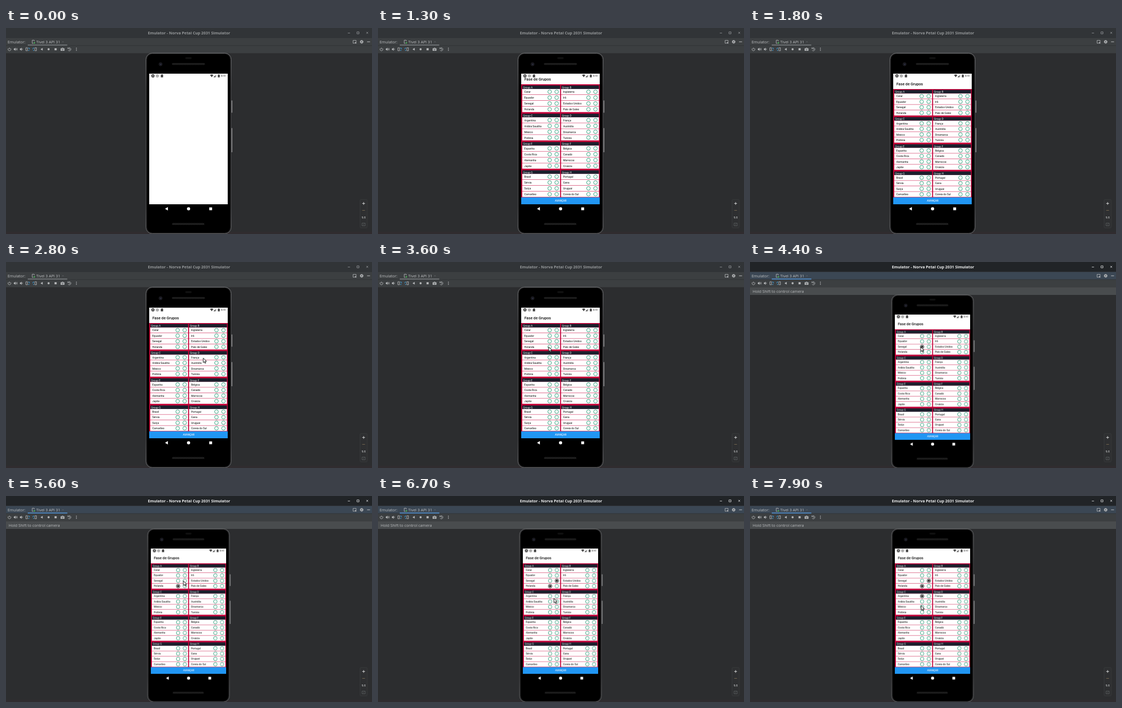
An HTML page for the animation above (8000 ms loop, 690 px wide and 388 px high).

```html
<!DOCTYPE html>
<html lang="pt">
<head>
<meta charset="utf-8">
<title>Emulator</title>
<style>
html, body { margin: 0; width: 100%; height: 100%; overflow: hidden; background: #2c2d2f; }
svg { display: block; width: 100vw; height: 100vh; }
text { dominant-baseline: central; white-space: pre; }
.ide { font: 7.4px "Open Sans", "Noto Sans", sans-serif; fill: #bcbec0; }
.title { font-weight: 700; font-size: 7.3px; text-anchor: middle; }
.app { font: 5px Roboto, sans-serif; fill: #0c0c0c; }
.icons { fill: none; stroke: #b4b6b8; stroke-width: .9; }
.icons .solid { fill: #b4b6b8; stroke: none; }
.radio { fill: #fff; stroke: #16906a; stroke-width: .85; }
.crisp { shape-rendering: crispEdges; }

.step { animation: 8s step-end infinite; }
.early { animation-name: early; }
.settled { animation-name: settled; }
.idle { animation-name: idle; }
.active { animation-name: active; }
.phone { animation-name: phone; }
.pick1 { animation-name: pick1; }
.pick2 { animation-name: pick2; }
.pick3 { animation-name: pick3; }
.pick4 { animation-name: pick4; }
@keyframes early { 0%, 17.5% { visibility: hidden } 16.25% { visibility: visible } }
@keyframes settled { 0% { visibility: hidden } 17.5%, to { visibility: visible } }
@keyframes idle { 0% { visibility: visible } 46.25%, to { visibility: hidden } }
@keyframes active { 0% { visibility: hidden } 46.25%, to { visibility: visible } }
@keyframes phone {
  0% { transform: none }
  46.25%, to { transform: translate(14.1px, 16.5px) scale(.959) }
}
@keyframes pick1 { 0%, 61.25%, to { visibility: hidden } 52.5% { visibility: visible } }
@keyframes pick2 { 0% { visibility: hidden } 61.25%, to { visibility: visible } }
@keyframes pick3 { 0% { visibility: hidden } 75%, to { visibility: visible } }
@keyframes pick4 { 0% { visibility: hidden } 93.75%, to { visibility: visible } }

.cursor { animation: cursor 8s linear infinite; }
@keyframes cursor {
  0%, 27.5% { opacity: 0; transform: translate(512px, 290px) }
  27.6% { opacity: 1 }
  35%, 37.5% { transform: translate(371.8px, 180.8px) }
  43.75%, 55% { transform: translate(321.8px, 159.8px) }
  60%, 63.75% { transform: translate(323px, 168.5px) }
  68.75%, 77.5% { transform: translate(334.4px, 159.8px) }
  85% { transform: translate(331px, 199px) }
  88.75%, 93.75% { transform: translate(322.5px, 187.5px) }
  96.25% { transform: translate(335px, 195px) }
  98.5%, to { opacity: 1; transform: translate(322.6px, 206.3px) }
}
</style>
</head>
<body>
<svg viewBox="0 0 690 388" preserveAspectRatio="none">
  <defs>
    <linearGradient id="edge" x2="0" y2="1">
      <stop offset="0" stop-color="#77787a"/><stop offset=".2" stop-color="#4a4a4c"/>
      <stop offset=".85" stop-color="#4a4a4c"/><stop offset="1" stop-color="#707173"/>
    </linearGradient>
    <pattern id="mesh" width="3" height="3" patternUnits="userSpaceOnUse">
      <rect width="3" height="3" fill="#121212"/>
      <path d="M0 3L3 0M0 0L3 3" stroke="#2c2c2c" stroke-width=".7"/>
    </pattern>
  </defs>

  <rect width="690" height="388" fill="#2c2d2f"/>
  <rect y="384" width="690" height="4" fill="#302c2f"/>

  <!-- window chrome -->
  <rect width="690" height="47.5" fill="#3c3f41"/>
  <rect width="690" height="18" fill="#313437"/>
  <rect class="step active" width="690" height="18" fill="#212427"/>
  <rect class="step active" y="18.5" width="690" height="14.5" fill="#3b4754"/>
  <path d="M0 18.5H690M0 33H690" stroke="#2f3234" stroke-width=".8"/>
  <g class="ide title">
    <text class="step idle" x="345" y="9.3" fill="#96999b">Emulator - Norva Petal Cup 2031 Simulator</text>
    <text class="step active" x="345" y="9.3" style="fill:#f0f1f2">Emulator - Norva Petal Cup 2031 Simulator</text>
  </g>
  <path class="step idle" d="M644.5 9.5H648.5M661.7 7.3H665.5V11H661.7ZM679.4 7.5L682.6 10.7M682.6 7.5L679.4 10.7" fill="none" stroke="#94979a" stroke-width=".9"/>
  <path class="step active" d="M644.5 9.5H648.5M661.7 7.3H665.5V11H661.7ZM679.4 7.5L682.6 10.7M682.6 7.5L679.4 10.7" fill="none" stroke="#dcdedf" stroke-width=".9"/>

  <g class="ide">
    <text x="3" y="26">Emulator:</text>
    <text x="57" y="26">Tivel 3 API 31</text>
  </g>
  <rect x="41" y="31.3" width="74.5" height="1.7" fill="#777b7e"/>
  <rect class="step active" x="41" y="31.3" width="74.5" height="1.7" fill="#4a88c7"/>
  <path d="M106.2 24.9L108.6 27.3M108.6 24.9L106.2 27.3" stroke="#64686a" stroke-width=".7"/>
  <g class="icons">
    <path d="M53.2 25V23H49.4V29H51.5"/>
    <circle cx="53.4" cy="28" r="1.6" fill="#4fa85c" stroke="none"/>
    <path d="M660 26.5V23.3H654.3V28.7H657"/>
    <path class="solid" d="M657.6 26.8H660.5V29.2H657.6Z"/>
    <circle cx="670.5" cy="26" r="1.9" stroke-width="1.6"/>
    <circle cx="670.5" cy="26" r="3" stroke-dasharray="1.2 1.16" stroke-width="1"/>
    <path d="M680.7 26H686.3" stroke-width="1.1"/>

    <path d="M4.7 38.2A2.7 2.7 0 1 0 8.3 38.2M6.5 37V40"/>
    <path class="solid" d="M14.7 38.8H16L18 37V43L16 41.2H14.7ZM26.2 38.8H27.5L29.5 37V43L27.5 41.2H26.2Z"/>
    <path d="M19 38.7Q20 40 19 41.3M20.3 37.6Q22 40 20.3 42.4M30.5 38.7Q31.5 40 30.5 41.3"/>
    <path d="M37.5 37.2H40.6V42.8H37.5ZM54.4 37.2H57.5V42.8H54.4Z"/>
    <path d="M42 37.6Q44.6 37.5 44.2 40.2M42 42.4H44M53 37.6Q50.4 37.5 50.8 40.2M53 42.4H51" stroke="#3e94c8" stroke-width="1.1"/>
    <path class="solid" d="M65 40L69.2 37.6V42.4ZM91.5 38H95.5V42H91.5ZM103 38.2H105L105.7 37.2H107.6L108.3 38.2H110.2V43H103Z"/>
    <circle class="solid" cx="80.3" cy="40" r="2"/>
    <circle cx="106.6" cy="40.5" r="1.3" fill="#b4b6b8" stroke="#3c3f41" stroke-width=".7"/>
    <path d="M117 38.5A2.9 2.9 0 1 1 117 41.7M116.5 36.9V38.8H118.5M119.6 38.3V40.2L121 41"/>
    <path d="M132.7 37V43" stroke-width="1.3" stroke-dasharray="1.3 1"/>
  </g>

  <g class="step active">
    <rect y="47.5" width="690" height="14.5" fill="#494c4e"/>
    <text class="ide" x="5" y="54.7">Hold Shift to control camera</text>
  </g>

  <!-- zoom panel -->
  <rect x="667.5" y="323" width="13.5" height="53.5" rx="2" fill="#2e2f31" stroke="#3d3f41" stroke-width=".7"/>
  <path d="M671.6 330.5H676.8M674.2 327.9V333.1" stroke="#d0d2d3"/>
  <path d="M671.6 343.5H676.8" stroke="#74664f"/>
  <text class="ide" x="674.2" y="356.5" text-anchor="middle" style="font-size:5.5px;font-weight:700;fill:#d0d2d3">1:1</text>
  <path d="M671.2 367.5H677.2V372.5H671.2ZM673 371L675.5 369" fill="none" stroke="#5f6264" stroke-width=".8"/>

  <g class="step phone">
    <path d="M425.7 136.5V159.5M425.7 188.5V234" stroke="#8c8c8e" stroke-width="1.9"/>
    <rect x="263.7" y="47.4" width="160.9" height="339.9" rx="12" fill="#19191a" stroke="url(#edge)"/>
    <rect x="266" y="49" width="156.3" height="336.6" rx="10.5"/>
    <circle cx="291.4" cy="68.2" r="3.1" fill="#15151b" stroke="#292930" stroke-width=".6"/>
    <circle cx="291.6" cy="68.4" r="1" fill="#3c4058"/>
    <rect x="338" y="55" width="12" height="3.6" rx="1.8" fill="#111"/>
    <rect x="313" y="66" width="62" height="3.6" rx="1.5" fill="url(#mesh)"/>
    <rect x="313" y="367.3" width="61" height="3.6" rx="1.5" fill="url(#mesh)"/>
    <rect class="crisp" x="270" y="85.6" width="148.2" height="246.4" fill="#fff"/>
    <g fill="#fff">
      <path d="M299.8 340.5L305.2 337.3V343.7Z"/>
      <circle cx="344.2" cy="340.5" r="3"/>
      <rect x="383.2" y="337.9" width="5.3" height="5.3"/>
    </g>
    <g id="early" class="step early"></g>
    <g id="settled" class="step settled"></g>
    <g id="picks"></g>
    <g fill="#484848">
      <circle cx="277" cy="90.2" r="3.1"/>
      <path d="M275.6 91.6L277 88.6L278.4 91.6" fill="none" stroke="#fff" stroke-width=".6"/>
      <circle cx="285.3" cy="90.2" r="2.5" fill="none" stroke="#5a5a5a" stroke-width=".8"/>
      <circle cx="285.3" cy="90.2" r="1"/>
      <path d="M292.9 87.6H296.2V92.9H291.8V88.7Z"/>
      <path d="M384.6 88.6Q387.8 86.2 391 88.6L387.8 92.8Z"/>
      <path d="M396.4 87.6V92.7H391.3Z" fill="#aaa"/>
      <path d="M394.4 89.6V92.7H391.3Z"/>
      <path d="M400.4 87.4H402V88H403V92.9H399.4V88H400.4Z"/>
    </g>
    <text class="app" x="405.2" y="90.4" style="fill:#3a3a3a">8:41</text>
  </g>

  <path class="cursor" d="M0 0V8.6L2 6.9L3.4 10L4.9 9.3L3.5 6.3H6.2Z" fill="#fff" stroke="#111" stroke-linejoin="round"/>
</svg>

<script>
const groups = [
  'Catar,Equador,Senegal,Holanda', 'Inglaterra,Irã,Estados Unidos,País de Gales',
  'Argentina,Arábia Saudita,México,Polônia', 'França,Austrália,Dinamarca,Tunísia',
  'Espanha,Costa Rica,Alemanha,Japão', 'Bélgica,Canadá,Marrocos,Croácia',
  'Brasil,Sérvia,Suíça,Camarões', 'Portugal,Gana,Uruguai,Coreia do Sul'
].map(names => names.split(','));

const LIST_END = 319.2, HEAD = 8.9, RADIO_X = [323.6, 336.8];

// Vertical metrics of the list when it starts at the given height
function layout(top) {
  const size = (LIST_END - top) / 4;
  const pitch = (size - HEAD - .4) / 4;
  return {
    pitch,
    groupY: g => top + (g >> 1) * size,
    rowY: (g, row) => top + (g >> 1) * size + HEAD + row * pitch
  };
}

const text = (x, y, str, style = '') => `<text class="app" x="${x}" y="${y}" style="${style}">${str}</text>`;
const rect = (x, y, w, h, fill, cls = '') => `<rect class="${cls}" x="${x}" y="${y}" width="${w}" height="${h}" fill="${fill}"/>`;

function drawPage(top) {
  const { pitch, groupY, rowY } = layout(top);
  let out = text(276, top - 9.3, 'Fase de Grupos', 'font-size:7.2px;font-weight:500')
    + rect(270, top, 148.2, LIST_END - top, '#c4043b', 'crisp');
  groups.forEach((names, g) => {
    const dx = g % 2 * 73.2, y = groupY(g);
    out += rect(272 + dx, y + 2.2, 71.3, HEAD - 2.2, '#1b1f2c')
      + text(273.5 + dx, y + 5.7, 'Group ' + 'ABCDEFGH'[g], 'fill:#f2f2f2');
    names.forEach((name, row) => {
      const ry = rowY(g, row), mid = ry + pitch / 2 - .3;
      out += rect(272 + dx, ry, 71.3, pitch - .55, '#fff') + text(275.8 + dx, mid + .1, name);
      for (const x of RADIO_X) out += `<circle class="radio" cx="${x + dx}" cy="${mid}" r="3.45"/>`;
    });
  });
  return out + rect(270, LIST_END, 148.2, 332 - LIST_END, '#2196f3', 'crisp')
    + text(344.3, 325.8, 'AVANÇAR', 'fill:#eef6ff;font-size:4.75px;font-weight:500;text-anchor:middle');
}

function drawPick([group, row, column], i) {
  const { pitch, rowY } = layout(114.5);
  const at = `cx="${RADIO_X[column]}" cy="${rowY(group, row) + pitch / 2 - .3}"`;
  return `<g class="step pick${i + 1}"><circle ${at} r="3.45" fill="#fff" stroke="#111" stroke-width=".9"/>`
    + `<circle ${at} r="2" fill="#111"/></g>`;
}

const fill = (id, markup) => { document.getElementById(id).innerHTML = markup; };
fill('early', drawPage(106));
fill('settled', drawPage(114.5));
fill('picks', [[0, 2, 0], [0, 3, 0], [0, 2, 1], [2, 0, 0]].map(drawPick).join(''));
</script>
</body>
</html>
```
